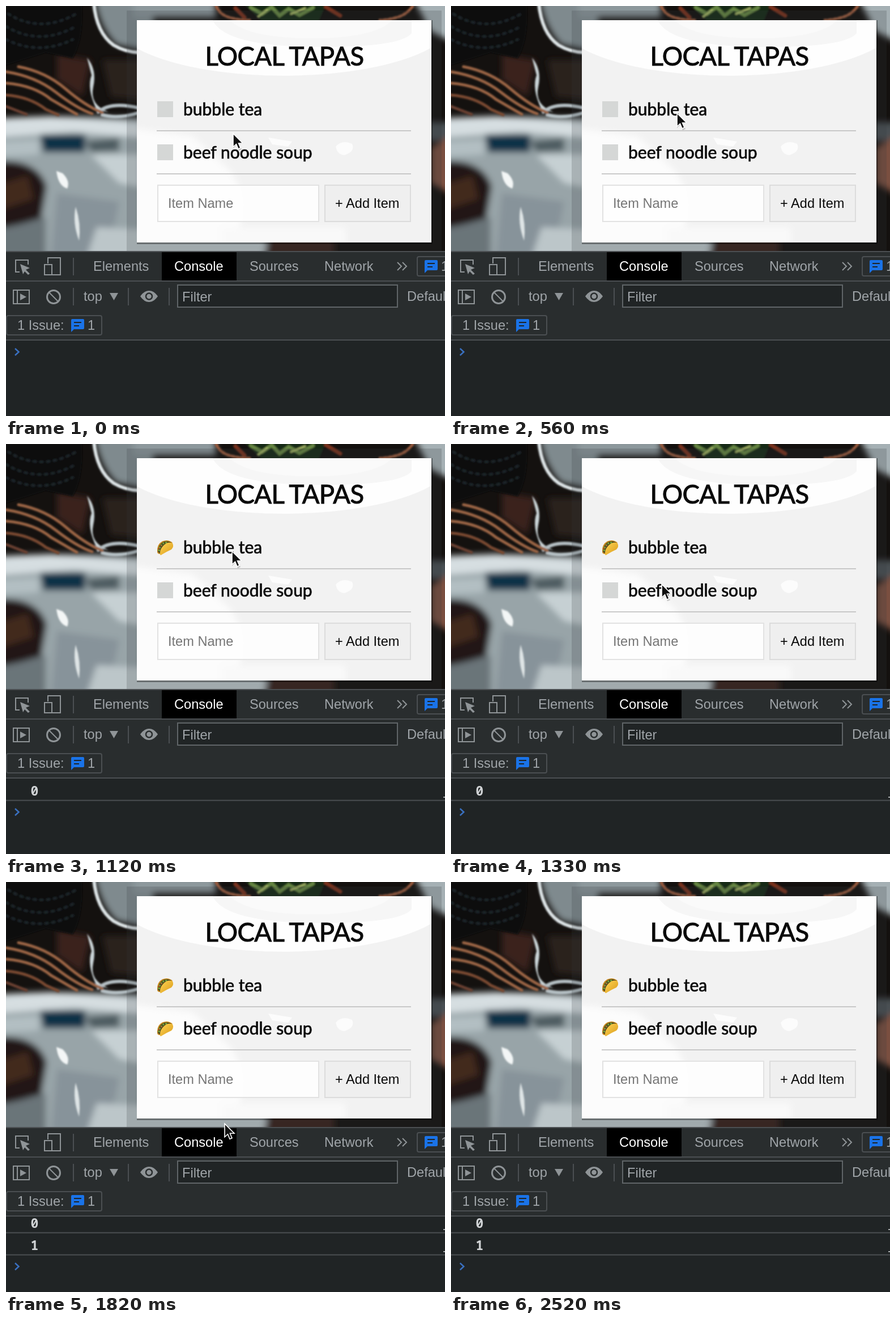
An HTML page that plays this animation: 775 by 723 pixels, repeating every 2.59 s.

```html
<!DOCTYPE html>
<html lang="en">
<head>
<meta charset="utf-8">
<title>Tapas list and console</title>
<style>
  html, body { margin: 0; width: 100%; height: 100%; overflow: hidden; background: #202425; }
  svg { display: block; }
  text { white-space: pre; }
  .list { font: 400 30px Lato, sans-serif; stroke: #0a0a0a; stroke-width: .7; fill: #0a0a0a; }
  .title { font-size: 45.5px; stroke-width: 1; letter-spacing: -.6px; }
  .form { font: 23.6px "Liberation Sans", Arial, sans-serif; }
  .tools { font: 23.6px "Liberation Sans", Arial, sans-serif; fill: #a0a5a9; }
  .icon { fill: none; stroke: #8f9497; stroke-width: 2; }
  .rule { fill: none; stroke: #4b4f52; stroke-width: 2; }
  .log { font: 600 23px "Noto Sans Mono", monospace; fill: #d0d3d5; }
</style>
</head>
<body>
<svg width="775" height="723" viewBox="0 0 775 723">
  <defs>
    <filter id="soft" filterUnits="userSpaceOnUse" x="-60" y="-60" width="900" height="560"><feGaussianBlur stdDeviation="6"/></filter>
    <filter id="mild" filterUnits="userSpaceOnUse" x="-60" y="-60" width="900" height="560"><feGaussianBlur stdDeviation="1.6"/></filter>
    <clipPath id="photoArea"><path d="M0 0H775V432H0Z"/></clipPath>
    <clipPath id="cardArea"><path d="M231 25H751V417H231Z"/></clipPath>
    <linearGradient id="shell" x2="1" y2="1"><stop stop-color="#ffd552"/><stop offset="1" stop-color="#d99a1c"/></linearGradient>
    <g id="taco">
      <path d="M0 22Q-1 9 9 3.5Q19-.5 27 6L5 26Q0 26 0 22Z" fill="#c98a1d"/>
      <path d="M1 22Q2 9 11 4.500Q18 2 25 6L5 25Z" fill="#4d4720"/>
      <path d="M3 21L5 13L11 7L19 5" fill="none" stroke="#76a83b" stroke-width="3" stroke-dasharray="3 2"/>
      <path d="M3 17L9 9" stroke="#c5432d" stroke-width="2" stroke-dasharray="2 4"/>
      <path d="M5 27Q4 18 11 11Q19 3 27 7Q30 13 25 18Q16 22 8 27Q6 29 5 27Z" fill="url(#shell)"/>
    </g>
    <g id="chat">
      <path d="M2 0H21Q23 0 23 2V16Q23 18 21 18H5L0 23V2Q0 0 2 0Z" fill="#1a73e8"/>
      <path d="M5 6H18M5 12H14" stroke="#202425" stroke-width="2"/>
    </g>
  </defs>

  <!-- Blurred table photo -->
  <g clip-path="url(#photoArea)">
    <path d="M0 0H775V432H0Z" fill="#14110f"/>
    <g filter="url(#soft)">
      <path d="M155-20H260V82L195 68Q165 40 155-20Z" fill="#7f8a8e"/>
      <path d="M90 85L150 95L135 160L90 130Z" fill="#3a211b"/>
      <path d="M170 95H240V165L185 160Z" fill="#2c211d"/>
      <path d="M-20 200Q70 190 240 198V450H-20Z" fill="#98a4a8"/>
      <path d="M-20 198L80 194L240 206V232L120 222L-20 232Z" fill="#d6dee1"/>
      <path d="M60 226H140V258H66Z" fill="#0e3346"/>
      <path d="M140 238L200 232V256L150 258Z" fill="#4d5b61"/>
      <path d="M-20 240L58 236V262L-20 266Z" fill="#b3bfc3"/>
      <path d="M-20 274Q55 268 72 318L62 376L-20 396Z" fill="#231816"/>
      <path d="M-20 318L38 300L48 340L-20 362Z" fill="#42291f"/>
      <path d="M-20 398L70 372V450H-20Z" fill="#6b7579"/>
      <path d="M150 262L240 262V320L200 312Z" fill="#c6d0d3"/>
      <path d="M90 330L200 345L180 440H80Z" fill="#87939a"/>
      <path d="M160 390L460 405V450H140Z" fill="#bcc6c9"/>
      <path d="M470 400H580V450H450Z" fill="#38241b"/>
      <path d="M225-20H370V20H225Z" fill="#8d989c"/>
      <path d="M715-20H800V70L750 45Z" fill="#a5b0b4"/>
      <path d="M745 205H790V238H745Z" fill="#4a5053"/>
      <path d="M750 250L790 225V335L750 312Z" fill="#7a5040"/>
    </g>
    <g filter="url(#mild)" fill="none" stroke-linecap="round">
      <path d="M0 0H134Q137 58 118 92L70 82L0 104Z" fill="#090c10"/>
      <path d="M4 14Q62 50 127 12M0 36Q60 72 125 35M0 59Q58 88 118 59" stroke="#1f262b" stroke-width="4" stroke-dasharray="4 8"/>
      <path d="M155-5Q160 48 190 69Q210 81 235 82" stroke="#dde4e6" stroke-width="6"/>
      <path d="M143 91Q161 112 154 143T181 187L160 183Q142 145 151 122Z" fill="#cbd5d8"/>
      <path d="M163 187Q185 168 235 180M170 192Q198 200 235 188" stroke="#b5c0c4" stroke-width="6"/>
      <g stroke="#9b6545" stroke-width="5">
        <path d="M0 136Q50 140 80 165L125 191"/>
        <path d="M0 116Q52 124 88 152T152 190"/>
        <path d="M22 107Q70 116 105 146T170 188"/>
        <path d="M0 157Q42 160 70 182L92 192" stroke="#7a4a31"/>
        <path d="M0 177L36 191" stroke="#6a4130"/>
      </g>
      <path d="M89 291Q92 317 108 322Q114 309 100 295Z" fill="#f3f6f6"/>
      <path d="M123 354Q117 382 129 414Q133 384 123 354Z" fill="#dfe5e6"/>
      <path d="M371 0Q377 15 394 20T430 25M718 0Q708 15 690 20T660 25" stroke="#9b5b3c" stroke-width="5" stroke-dasharray="5 4"/>
      <path d="M420-3H565L552 27H452Z" fill="#182b18"/>
      <path d="M432 3L452 14L469 2L483 17L499 5L518 16L542 3" stroke="#668642" stroke-width="6"/>
      <path d="M445 19L461 7M503 14L528 4" stroke="#a9ba68" stroke-width="3"/>
      <path d="M565 2L590 17M405 4L421 20" stroke="#79321f" stroke-width="7"/>
    </g>
    <path d="M213 8H769V440H213Z" fill="#32393c" fill-opacity=".2"/>
    <path d="M231 417H753V420H231ZM751 25H753V420H751Z" fill-opacity=".35"/>
  </g>

  <!-- Card -->
  <g clip-path="url(#cardArea)">
    <path d="M231 25H751V417H231Z" fill="#f2f2f2"/>
    <ellipse cx="490" cy="25" rx="300" ry="98" fill="#fefefe"/>
    <path d="M365 25Q385 70 540 72T716 48V25Z" fill="#f6f6f6"/>
    <path d="M394 25Q430 57 540 57T682 25Z" fill="#fafafa"/>
    <g filter="url(#soft)">
      <path d="M220 215L330 230L395 290Q440 350 395 430H220Z" fill="#fcfcfc"/>
      <path d="M380 390H600V430H380Z" fill="#f9f9f9"/>
    </g>
    <path d="M582 248Q593 235 611 243Q617 257 597 263Q585 262 582 248ZM463 232L505 239L498 248L470 244Z" fill="#fcfcfc"/>
  </g>
  <path d="M266 220H715M266 296H715" stroke="#bbb" stroke-width="1.6"/>
  <path d="M268 316H552V380H268Z" fill="#fff" fill-opacity=".85" stroke="#e2e2e2" stroke-width="2"/>
  <path d="M563 316H714V380H563Z" fill="#efefef" stroke="#dcdcdc" stroke-width="2"/>
  <g class="list">
    <text class="title" x="491.500" y="105" text-anchor="middle">LOCAL TAPAS</text>
    <text x="313" y="193">bubble tea</text>
    <text x="313" y="269">beef noodle soup</text>
  </g>
  <g class="form">
    <text x="286" y="356" fill="#757575">Item Name</text>
    <text x="581" y="356" fill="#0a0a0a">+ Add Item</text>
  </g>
  <g id="boxes" fill="#d5d7d6">
    <g><path d="M267 168h28v28h-28z"/><use href="#taco" x="267" y="168"/></g>
    <g><path d="M267 244h28v28h-28z"/><use href="#taco" x="267" y="244"/></g>
  </g>

  <!-- Developer tools -->
  <path d="M0 432H775V590H0Z" fill="#292d2e"/>
  <path d="M0 590H775V723H0Z" fill="#202425"/>
  <path d="M275 434H407V484H275Z"/>
  <g class="rule">
    <path d="M0 433H775M0 485H775M0 589H775M119 444V475M119 497V528M216 497V528M288 497V528"/>
    <rect x="726" y="442" width="70" height="34" rx="3"/>
    <rect x="1" y="546" width="168" height="34" rx="3"/>
    <path d="M303 492H691V531H303Z" fill="#202425" stroke="#606568"/>
  </g>
  <g class="icon">
    <path d="M24 469H17V448H39V456"/>
    <path d="M25 455L42 462L35 465L42 472L39 474L33 468L30 473Z" fill="#8f9497" stroke="none"/>
    <path d="M74 454V444H96V474H82M68 456H81V474H68Z"/>
    <path d="M691 452L698 459L691 466M700 452L707 459L700 466"/>
    <path d="M13 501H41V525H13ZM20 501V525"/>
    <path d="M25 507L36 513L25 519Z" fill="#8f9497" stroke="none"/>
    <path d="M76 505L92 521"/><circle cx="84" cy="513" r="11.500" stroke-width="3"/>
    <path d="M183 506H198L190.500 519Z" fill="#8f9497" stroke="none"/>
    <path d="M237 512Q244 502 252.500 502T268 512Q261 522 252.500 522T237 512Z" fill="#8f9497" stroke="none"/>
    <circle cx="252.500" cy="512" r="5.500" fill="#8f9497" stroke="#292d2e" stroke-width="2.500"/>
  </g>
  <use href="#chat" x="739" y="448"/>
  <use href="#chat" x="115" y="552"/>
  <g class="tools">
    <text x="154" y="467">Elements</text>
    <text x="297" y="467" fill="#fff">Console</text>
    <text x="430" y="467">Sources</text>
    <text x="562" y="467">Network</text>
    <text x="768" y="467">1</text>
    <text x="137" y="520">top</text>
    <text x="311" y="521">Filter</text>
    <text x="708" y="520">Default levels</text>
    <text x="20" y="571">1 Issue:</text>
    <text x="144" y="571">1</text>
  </g>
  <g id="logs" class="log">
    <g><text x="43.500" y="620">0</text><path class="rule" d="M0 628.500H775"/><path d="M772 622h3v1.500h-3z"/></g>
    <g><text x="43.500" y="659">1</text><path class="rule" d="M0 667.500H775"/><path d="M772 661h3v1.500h-3z"/></g>
  </g>
  <path id="prompt" d="M16 604L22.500 610L16 616" fill="none" stroke="#3a70c0" stroke-width="2.500"/>
  <path id="caret" d="M46 597h2v28h-2z" fill="#fff"/>

  <g id="cursor">
    <path d="M1 2V27L7 21L11 31L16 29L12 19H20Z" fill="#000" fill-opacity=".2"/>
    <path d="M1 1V24.500L6.500 19.500L10 28L14 26.300L10.500 18H18Z" fill="#111" stroke="#fff" stroke-width="1.600"/>
  </g>
</svg>
<script>
  const LOOP = 2590, STEP = 70;
  const $ = id => document.getElementById(id);
  const show = (el, on) => el.style.display = on ? '' : 'none';

  // Cursor stops: time, x, y
  const path = [
    [0, 400, 224], [210, 398, 188], [1120, 398, 188],
    [1400, 366, 257], [1680, 366, 257], [2030, 420, 735], [LOOP, 420, 735]
  ];
  const checkedAt = [980, 1470], loggedAt = [1050, 1610];

  function cursorAt(t) {
    const i = path.findIndex(p => p[0] > t);
    const [t0, x0, y0] = path[i - 1], [t1, x1, y1] = path[i];
    const k = (t - t0) / (t1 - t0), ease = k * k * (3 - 2 * k);
    return [x0 + (x1 - x0) * ease, y0 + (y1 - y0) * ease];
  }

  function draw() {
    const t = Math.floor(performance.now() % LOOP / STEP) * STEP;
    $('cursor').setAttribute('transform', `translate(${cursorAt(t)})`);
    show($('caret'), t >= 140 && t < 560);
    [...$('boxes').children].forEach((box, i) => {
      const checked = t >= checkedAt[i];
      show(box.children[0], !checked);
      show(box.children[1], checked);
    });
    [...$('logs').children].forEach((row, i) => show(row, t >= loggedAt[i]));
    const count = loggedAt.filter(at => t >= at).length;
    const scroll = count > 1 ? -10 : 0;
    $('logs').setAttribute('transform', `translate(0 ${scroll})`);
    $('prompt').setAttribute('transform', `translate(0 ${39 * count + scroll})`);
    requestAnimationFrame(draw);
  }
  draw();
</script>
</body>
</html>
```
